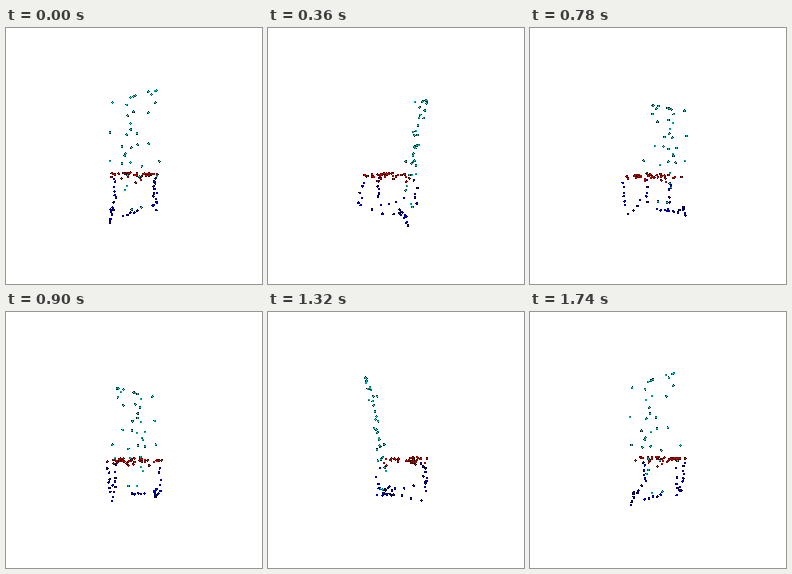
Animation, 256 px wide and 256 px high, one loop 1.8 s. Source, as a matplotlib script:

```python
import numpy as np
import matplotlib.pyplot as plt
from matplotlib.animation import FuncAnimation

SIZE, FRAMES, STEP_MS = 256, 30, 60
CENTER, CAMERA = 128, 228          # screen middle, eye distance in px
RADIUS = 1.3

CYAN, RED, BLUE = (0, 0.9, 0.9), (0.95, 0, 0), (0, 0, 0.95)
rng = np.random.default_rng(4)

# Backrest points: across, down, depth towards the eye at the start
back = np.array([
    (-19.7, -48.4, 23.4), (19.4, -58.2, 27), (18, -58, 26.5), (12.3, -57, 27.5),
    (15, -54.5, 27.5), (18.5, -48, 25), (12.4, -39, 25), (0.9, -53.8, 27),
    (-0.9, -53, 27), (-3.5, -52, 27), (-7, -46, 25), (-6.2, -36.5, 24.4),
    (-0.9, -40, 24.4), (-3.6, -29.7, 22.7), (-3.4, -24.5, 21), (-22.2, -21.6, 22.7),
    (2.2, -21, 21), (-7.2, -20, 20), (-11.5, -9, 21), (-2.8, -8, 20),
    (12.9, -11.6, 20), (2.9, -10.8, 20), (-8.2, -2.7, 19.3), (-9, -0.8, 19),
    (-3.6, 5.5, 17.6), (-11.5, 6.4, 18.5), (6.7, 9, 18.5), (-22.8, 4.4, 16),
    (23.5, 4.5, 13), (-9, 32, 12), (-7, 28, 13), (-2.5, 49, 17), (6.5, 48, 13),
    (21, 18.5, 15), (4.5, 18.7, 15), (-6.5, 17.5, 15),
])


def make_seat():
    rail = np.array([24.8, 20.2, 18.3, 16.5, 15.6, 13.8, 12.8, 11, 9.2, 7.3, 5.5,
                     2.8, 0, -4.6, -6.4, -9.2, -12, -13.8, -17.4, -21, -23, -24.8])
    loose = 14
    x = np.concatenate([rail, rng.uniform(-23, 23, loose)])
    z = np.concatenate([rng.normal(-20, 4, len(rail)), rng.uniform(-31, 15, loose)])
    y = 18 + rng.exponential(1.7, len(x))
    return np.column_stack([x, y, z])


def rod(start, end, n):
    t = np.linspace(0, 1, n)[:, None]
    line = np.array(start) * (1 - t) + np.array(end) * t
    return line + rng.normal(0, 0.9, (n, 3))


legs = np.vstack([
    rod((-22, 25, -26), (-23, 48, -30), 6),
    rod((-22, 50, -16), (-22, 54, 4), 3),
    rod((-22, 50, 12), (-22, 61, 18), 7),
    rod((22, 25, -28), (21, 45, -29), 6),
    rod((21, 53, -24), (21, 46, 2), 4),
    rod((21, 27, 14), (21, 51, 16), 5),
    rod((-10, 55, 13), (2, 54, 2), 5),
])
seat = make_seat()
points = np.vstack([back, seat, legs])
colors = np.repeat([CYAN, RED, BLUE], [len(back), len(seat), len(legs)], axis=0)


def project(angle):
    x, y, z = points.T
    c, s = np.cos(angle), np.sin(angle)
    near = z * c - x * s
    scale = CAMERA / (CAMERA - near)
    return CENTER + (x * c + z * s) * scale, CENTER + y * scale, near


def render(k):
    img = np.ones((SIZE, SIZE, 3))
    u, v, near = project(2 * np.pi * k / FRAMES)
    for i in np.argsort(near):
        cx, cy = int(round(u[i])), int(round(v[i]))
        for py in range(cy - 1, cy + 2):
            for px in range(cx - 1, cx + 2):
                d2 = ((px - u[i]) ** 2 + (py - v[i]) ** 2) / RADIUS ** 2
                if d2 < 1:
                    img[py, px] = colors[i] * (1 - d2)
    return img


fig = plt.figure(figsize=(SIZE / 100, SIZE / 100), dpi=100, facecolor="white")
ax = fig.add_axes([0, 0, 1, 1])
ax.axis("off")
picture = ax.imshow(render(0), interpolation="nearest", aspect="auto")


def update(k):
    picture.set_data(render(k))
    return [picture]


anim = FuncAnimation(fig, update, frames=FRAMES, interval=STEP_MS,
                     repeat=True, repeat_delay=0)
plt.show()
```
